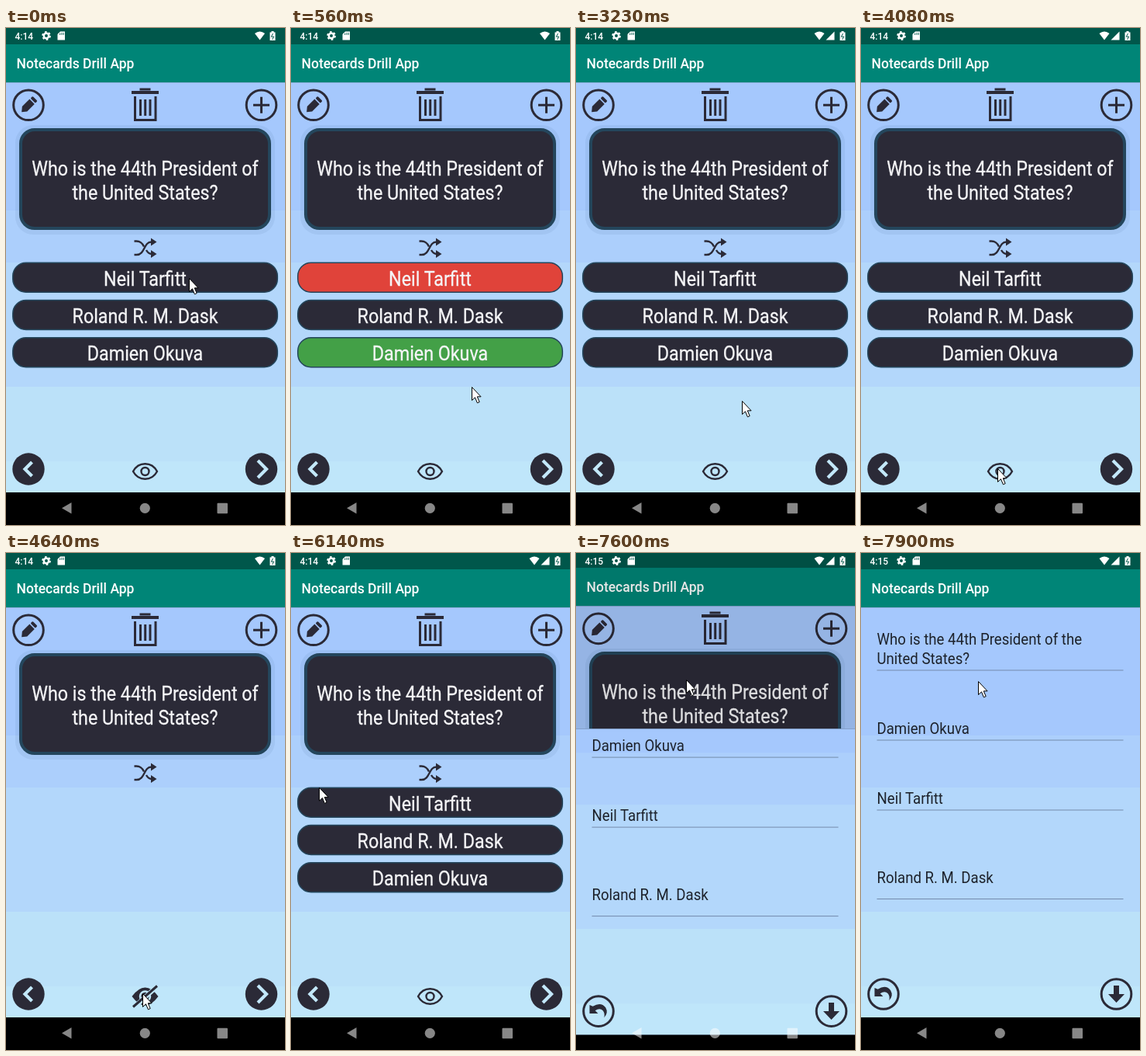
Recreate the animation shown at these times as an HTML page. Size 360 px wide and 640 px high, loop 8 s.

```html
<!DOCTYPE html>
<html lang="en">
<head>
<meta charset="utf-8">
<title>Study cards</title>
<style>
  html, body { margin: 0; width: 100%; height: 100%; overflow: hidden; background: #000; }
  svg { display: block; width: 100vw; height: 100vh; }
  text { font-family: Roboto, "Noto Sans", sans-serif; }
  .title { font-size: 17.5px; font-weight: 500; fill: #fff; }
  .clock { font-size: 12px; font-weight: 500; fill: #fff; }
  /* condensed cut of the typeface */
  .big, .field { transform: scaleX(.887); }
  .big { font-size: 26.25px; fill: #f5f5f7; stroke: #f5f5f7; stroke-width: .3; text-anchor: middle; }
  .field { font-size: 21px; fill: #1d222b; }
  .ink { fill: #2b2a37; }
  .line { fill: none; stroke: #2b2a37; stroke-width: 3; }
  .thin { stroke-width: 2.4; }
  .thick { stroke-width: 4; }
  .arrow { fill: none; stroke: #c3e8fb; stroke-width: 4.2; }
</style>
</head>
<body>
<svg viewBox="0 0 360 640" preserveAspectRatio="none">
  <defs>
    <clipPath id="reveal"><rect id="revealBox" width="360" height="640"/></clipPath>
    <g id="frame">
      <rect width="360" height="640"/>
      <g id="sky"></g>
      <rect y="70" width="360" height="1" fill="#234" opacity=".15"/>
      <rect width="360" height="70" fill="#008577"/>
      <rect width="360" height="21" fill="#00574b"/>
      <text class="title" x="13.5" y="52">Notecards Drill App</text>
    </g>
    <circle id="ring" class="line" r="19.3"/>
  </defs>

  <g id="main">
    <use href="#frame"/>
    <g transform="translate(29 99.3)">
      <use href="#ring"/>
      <g class="ink" transform="rotate(45)">
        <path d="M-4.500-6.500h9V7L0 12.500-4.500 7z"/>
        <rect x="-4.500" y="-12" width="9" height="4" rx="1.500"/>
      </g>
      <circle id="press" r="18" fill="#2b2a37" opacity=".2"/>
    </g>
    <g class="line">
      <path class="thick" d="M162 83h35"/>
      <path d="M174 80.500v-1.500h11v1.500M166.500 88v30.500h26.500V88M173.500 92v21M179.700 92v21M186 92v21"/>
    </g>
    <g transform="translate(329.500 99.300)">
      <use href="#ring"/>
      <path class="line" d="M-10.500 0h21M0-10.500v21"/>
    </g>

    <rect x="12" y="125" width="335" height="141" rx="23" fill="#456a9c" opacity=".1"/>
    <rect x="19" y="131" width="321" height="127" rx="18" class="ink" stroke="#24465c" stroke-width="4"/>
    <g id="question"></g>

    <path class="line thin" d="M165.500 274.500h3c6 0 8 4 9.500 7M181 286c2 3.500 4 5 7 5h1M165.500 292h3c11 0 9-16.500 19-16.500h1"/>
    <path class="ink" d="M187 270.500l7.500 5-7.500 5zM187 286l7.500 5-7.500 5z"/>

    <g id="answers"></g>

    <circle class="ink" cx="29" cy="568" r="20.700"/>
    <path class="arrow" d="M33.500 559l-9 9 9 9"/>
    <circle class="ink" cx="329.500" cy="568" r="20.700"/>
    <path class="arrow" d="M325 557l11 11-11 11"/>

    <g id="eyeOpen" class="line thin">
      <path d="M164 571c7-13 24-13 31 0-7 13-24 13-31 0z"/>
      <circle cx="179.500" cy="571" r="5"/>
    </g>
    <g id="eyeShut">
      <path class="ink" d="M162.500 571q17-23 34 0-17 23-34 0z"/>
      <circle cx="179.500" cy="571" r="6.500" fill="none" stroke="#bfe6fa" stroke-width="2.500"/>
      <path d="M164 586l31-28" stroke="#bfe6fa" stroke-width="6"/>
      <path class="line" d="M164 584.500l31-27"/>
    </g>
  </g>

  <rect id="scrim" width="360" height="640"/>

  <g clip-path="url(#reveal)">
    <g id="edit">
      <use href="#frame"/>
      <g id="fields"></g>
      <g transform="translate(29 568)">
        <use href="#ring"/>
        <path class="ink" d="M-11.500-8v11h11l-3.800-3.800q6-4 10 0 3 3.500 1.500 9 6-6 2-13-6-8-16.500-1.500z"/>
      </g>
      <g transform="translate(329.500 568)">
        <use href="#ring"/>
        <path class="ink" d="M-3.500-11h7V0h7L0 11-10.500 0h7z"/>
      </g>
    </g>
  </g>

  <g fill="#fff" opacity=".53">
    <path d="M72 618.300l12.500-7.300v14.600z"/>
    <circle cx="179.300" cy="618.300" r="6.600"/>
    <rect x="272.500" y="611.700" width="13.500" height="13.500" rx="1"/>
  </g>

  <text id="clock" class="clock" x="11.500" y="14.500"></text>
  <circle cx="52" cy="10" r="3.200" fill="none" stroke="#fff" stroke-width="2.500"/>
  <circle cx="52" cy="10" r="5" fill="none" stroke="#fff" stroke-width="1.800" stroke-dasharray="2.600 2.636"/>
  <path d="M70 4.500h6v11h-9.500v-7.500z" fill="#fff"/>
  <path d="M69.700 6.500v2.500M72 6v3M74.200 6v3" stroke="#00574b" stroke-width=".9"/>
  <path id="wifi" d="M-6.500 7q6.500-5 13 0L0 15.500z" fill="#fff"/>
  <path id="signal" d="M322.500 15.500h11v-11z" fill="#fff"/>
  <path d="M340.500 5.500h2V4h3v1.500h2v10.500h-7z" fill="#fff"/>
  <path d="M344.500 7l-2.200 4.200h3.400l-2.200 3.600" fill="none" stroke="#00574b"/>

  <path id="cursor" d="M.5.500v17l4-3.700 2.900 7 2.800-1.200-2.900-6.800h4.800z" fill="#fff" stroke="#000"/>
</svg>

<script>
const LOOP = 8000;
const $ = id => document.getElementById(id);
const names = ["Neil Tarfitt", "Roland R. M. Dask", "Damien Okuva"];
const BASE = "#2b2a37", WRONG = "#e0433a", RIGHT = "#43a047";

// pointer moves: start, end, x, y
const moves = [
  [0, 0, 236, 322], [280, 560, 233, 462], [1300, 1480, 232, 374],
  [2200, 2430, 214, 480], [3300, 4080, 176, 567], [5570, 5870, 128, 577],
  [5870, 6140, 36, 302], [6140, 6650, 25, 95], [7360, 7600, 142, 163],
  [7600, 7900, 151, 165]
];

const progress = (t, a, b) => Math.min(1, Math.max(0, (t - a) / (b - a || 1)));
const between = (t, a, b) => t >= a && t < b;
const show = (id, on) => $(id).setAttribute("visibility", on ? "visible" : "hidden");
const move = (id, x, y) => $(id).setAttribute("transform", `translate(${x} ${y})`);
const label = (cls, x, y, s) => `<g transform="translate(${x} ${y})"><text class="${cls}">${s}</text></g>`;

// each band paints down to the bar, the next one covers its lower part
$("sky").innerHTML = Object.entries({ 70: "#a5c8fd", 235: "#accffc", 302: "#b3d7fb", 462: "#bbe1f9", 558: "#bfe6fa" })
  .map(([y, fill]) => `<rect y="${y}" width="360" height="${598 - y}" fill="${fill}"/>`).join("");

$("question").innerHTML = ["Who is the 44th President of", "the United States?"]
  .map((s, i) => label("big", 179.5, 190 + 31 * i, s)).join("");

$("answers").innerHTML = names.map((name, i) => {
  const y = 302.2 + i * 48.3;
  return `<rect x="8.8" y="${y}" width="341.5" height="38" rx="17" stroke="#24465c" stroke-width="1.5"/>` +
    label("big", 179.5, y + 29.6, name);
}).join("");
const buttons = [...$("answers").querySelectorAll("rect")];

const field = (y, rule, s) => label("field", 20.5, y, s) +
  (rule ? `<rect x="20.5" y="${rule}" width="318" height="1" fill="#748bab"/>` : "");
$("fields").innerHTML =
  field(118, 0, "Who is the 44th President of the") + field(143, 150.5, "United States?") +
  field(233, 240.5, names[2]) + field(323, 330.5, names[0]) + field(425, 445, names[1]);

function pointerAt(t) {
  let x = 0, y = 0;
  for (const [a, b, toX, toY] of moves) {
    if (t < a) break;
    const p = a === b ? 1 : progress(t, a, b);
    x += (toX - x) * p;
    y += (toY - y) * p;
  }
  return [x, y];
}

function draw(t) {
  const picked = between(t, 280, 1360) ? 0 : between(t, 2160, 3230) ? 1 : -1;
  buttons.forEach((b, i) => b.setAttribute("fill",
    picked < 0 ? BASE : i === picked ? WRONG : i === 2 ? RIGHT : BASE));

  const closed = between(t, 4360, 5070);
  show("answers", !closed);
  show("eyeOpen", !closed);
  show("eyeShut", closed);
  show("press", between(t, 6810, 6960));

  const weak = between(t, 1760, 1880) || between(t, 4360, 4640);
  const signal = between(t, 1760, 4640) || t >= 5720;
  show("signal", signal);
  $("signal").setAttribute("opacity", weak ? .35 : 1);
  move("wifi", signal ? 314 : 327.5, 0);
  $("clock").textContent = t < 6530 ? "4:14" : "4:15";

  // the edit page slides up late while it is uncovered early
  const p = progress(t, 7360, 7860), slide = p ** 2.6;
  move("main", 0, -13 * slide);
  $("scrim").setAttribute("opacity", .1 * Math.min(1, p * 2));
  move("edit", 0, 26 * (1 - slide));
  $("revealBox").setAttribute("y", 640 * (1 - p) ** 1.58);

  move("cursor", ...pointerAt(t));
}

const start = performance.now();
function tick() {
  draw((performance.now() - start) % LOOP);
  requestAnimationFrame(tick);
}
tick();
</script>
</body>
</html>
```
